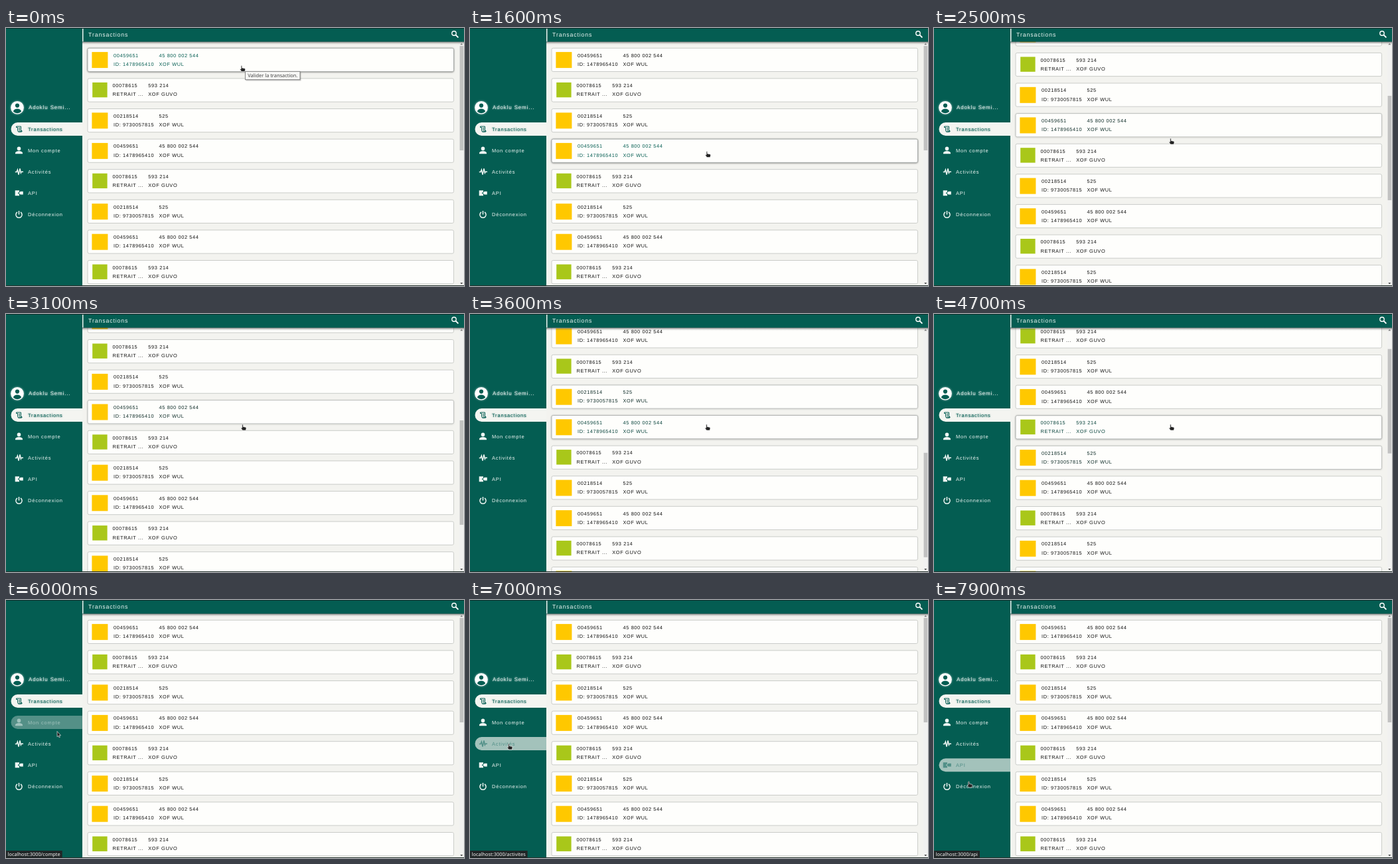
Animation, 690 px wide and 388 px high, one loop 8000 ms. Source, as an HTML page:

```html
<!DOCTYPE html>
<html lang="fr">
<head>
<meta charset="utf-8">
<title>Transactions</title>
<style>
  html, body { margin: 0; width: 100%; height: 100%; overflow: hidden; background: #f3f3ef; }
  svg { display: block; width: 100vw; height: 100vh; }
  text { font-family: "Liberation Sans", Arial, sans-serif; text-rendering: geometricPrecision; white-space: pre; }
  .cell { font-size: 7.4px; letter-spacing: .62px; }
  .nav { font-size: 7.5px; letter-spacing: .82px; }
  .user { font-size: 8px; letter-spacing: .85px; fill: #eef6f3; }
  .title { font-size: 8.8px; letter-spacing: .85px; fill: #eef6f3; }
  .system { font-family: "Noto Sans", "Open Sans", sans-serif; font-size: 7.4px; }
  .glow { filter: drop-shadow(0 0 1.5px #fff9); }
  .blur { filter: drop-shadow(.7px .8px .8px #045d5299); }
</style>
</head>
<body>
<svg viewBox="0 0 690 388" preserveAspectRatio="none">
  <defs>
    <linearGradient id="shade" x2="0" y2="1">
      <stop stop-color="#1d3a35" stop-opacity=".85"/>
      <stop offset=".4" stop-color="#444" stop-opacity=".35"/>
      <stop offset="1" stop-color="#888" stop-opacity="0"/>
    </linearGradient>
    <filter id="lift" x="-5%" y="-30%" width="110%" height="160%">
      <feDropShadow dx="0" dy=".5" stdDeviation="1.3" flood-color="#000" flood-opacity=".5"/>
    </filter>
  </defs>

  <rect width="690" height="388" fill="#f3f3ef"/>
  <g id="list"></g>

  <rect x="683" y="21" width="7" height="367" fill="#f1f1f0"/>
  <path d="M684.3 25.2l2-2.3 2 2.3z" fill="#777"/>
  <path d="M684.3 383l2 2.3 2-2.3z" fill="#444"/>
  <rect id="thumb" x="683.6" width="5.6" height="157" fill="#c1c1c1"/>

  <rect x="115" y="20" width="575" height="5" fill="url(#shade)"/>
  <rect x="115" width="575" height="20.5" fill="#045d52"/>
  <rect x="115" width="1.5" height="20.5" fill="#eef3f0"/>
  <text class="title" x="124" y="13.2">Transactions</text>
  <g fill="none" stroke="#fff">
    <circle cx="675" cy="8" r="3.2" stroke-width="1.4"/>
    <path d="M677.4 10.4l4 4" stroke-width="1.9"/>
  </g>

  <rect width="115" height="388" fill="#045d52"/>
  <g class="glow">
    <circle cx="17" cy="119.8" r="9.8" fill="#fff"/>
    <circle cx="17" cy="116.6" r="3.1" fill="#045d52"/>
    <path d="M10.8 125.6q1.4-4 6.2-4t6.2 4q-2.4 2.6-6.2 2.6t-6.2-2.6z" fill="#045d52"/>
    <text class="user" x="34" y="122.3">Adoklu Semi...</text>
  </g>
  <g id="nav"></g>

  <rect width="690" height="1" fill="#0b2e2a"/>
  <rect y="387" width="690" height="1" fill="#26332f"/>

  <g id="tooltip">
    <rect x="361.5" y="66.5" width="83" height="13" fill="#0003"/>
    <rect x="360.4" y="65.3" width="82.6" height="12.4" fill="#f7f7f5" stroke="#777" stroke-width=".9"/>
    <text class="system" x="364.3" y="74.2" fill="#444" font-weight="500">Valider la transaction.</text>
  </g>
  <g id="status">
    <rect y="377" height="11" fill="#202627"/>
    <text class="system" x="2.5" y="385.2" fill="#f2f2f2"></text>
  </g>

  <g id="cursor" stroke="#fff" stroke-width=".6" stroke-linejoin="round" fill="#222">
    <path id="hand" d="M-1.4 .6Q-.7-.5.2.6V3.5L4 4.2Q5.2 4.6 5 6L4.3 9H-.6L-3 5.8Q-2.8 4.6-1.4 5.4z"/>
    <path id="arrow" d="M0 0V8.2L1.9 6.6 3 9.3 4.4 8.7 3.3 6.1H5.6z"/>
  </g>
</svg>
<script>
const LOOP = 8000, STEP = 100;
const ROWS = 18, FIRST = 30.3, PITCH = 45.6, CARD_H = 35.2;
const BLACK = [18, 18, 18], GREEN = [4, 93, 82], WHITE = [238, 246, 243];

const $ = id => document.getElementById(id);
function add(parent, tag, attrs = {}, content = '') {
  const el = document.createElementNS('http://www.w3.org/2000/svg', tag);
  for (const key in attrs) el.setAttribute(key, attrs[key]);
  el.textContent = content;
  return parent.appendChild(el);
}
const mix = (a, b, k) => `rgb(${a.map((v, i) => Math.round(v + (b[i] - v) * k))})`;

// Linear interpolation through [time, ...values] stops.
function track(stops, t) {
  const next = stops.findIndex(s => s[0] >= t);
  if (next < 0) return stops.at(-1).slice(1);
  if (next === 0) return stops[0].slice(1);
  const a = stops[next - 1], b = stops[next], k = (t - a[0]) / (b[0] - a[0]);
  return a.slice(1).map((v, i) => v + (b[i + 1] - v) * k);
}

const SCROLL = [[1700, 0], [2500, 175.3], [3100, 311], [3500, 425], [3700, 425],
  [4100, 189.3], [4300, 120], [4400, 120], [5000, 0]];
const POINTER = [[0, 355.5, 56.5], [300, 357, 110], [800, 360, 238], [950, 360, 238], [1300, 357.5, 185.5],
  [1700, 357.5, 185.5], [2100, 357, 166], [5000, 357, 166], [5300, 310, 170], [5700, 110, 190],
  [6000, 77, 197.5], [6300, 70, 188], [6600, 62, 186], [6900, 60, 214], [7300, 56, 222],
  [7600, 54, 241], [7800, 53, 256], [7900, 53, 273]];
const scrollAt = t => track(SCROLL, t)[0];
const pointerAt = t => track(POINTER, t);

const KINDS = [
  { phone: '00459651', ref: 'ID: 1478965410', amount: '45 800 002 544', unit: 'XOF WUL',
    x: 162, x2: 230.5, logo: { x: 129.4, y: 5.8, width: 24, height: 24, fill: '#ffc800' } },
  { phone: '00078615', ref: 'RETRAIT ...', amount: '593 214', unit: 'XOF GUVO',
    x: 160.5, x2: 214.3, logo: { x: 130.2, y: 6, width: 22.4, height: 22.4, fill: '#a9c71a' } },
  { phone: '00218514', ref: 'ID: 9730057815', amount: '525', unit: 'XOF WUL',
    x: 162, x2: 230.5, logo: { x: 129.4, y: 5.8, width: 24, height: 24, fill: '#ffc800' } }
];
const cards = Array.from({ length: ROWS }, (_, i) => {
  const kind = KINDS[i % 3], top = FIRST + i * PITCH;
  const g = add($('list'), 'g', { transform: `translate(0 ${top})` });
  const box = { x: 123, width: 551.5, height: CARD_H, rx: 2.2, fill: '#fefefc', 'stroke-width': .9 };
  add(g, 'rect', { ...box, stroke: '#c6c8c5' });
  const lift = add(g, 'rect', { ...box, stroke: '#a4a8a5', filter: 'url(#lift)' });
  add(g, 'rect', kind.logo);
  const label = add(g, 'g', { class: 'cell' });
  add(label, 'text', { x: kind.x, y: 13.4 }, kind.phone);
  add(label, 'text', { x: kind.x, y: 26.6 }, kind.ref);
  add(label, 'text', { x: kind.x2, y: 13.4 }, kind.amount);
  add(label, 'text', { x: kind.x2, y: 26.6 }, kind.unit);
  return { top, lift, label };
});

// Icons are drawn around (19.5, 0); `line` icons are stroked.
const NAV = [
  { name: 'Transactions', y: 152, active: true, line: 1,
    icon: 'M16-4H22.5V4H18.5L17.5 2.5V-2.5H15.5V-4zM19-1.8H21.3M19 0H21.3M19 1.8H21.3M18.5 4H24V2.5H22.5' },
  { name: 'Mon compte', y: 184, path: 'compte',
    icon: 'M16.7-2.6a2.8 2.8 0 0 1 5.6 0a2.8 2.8 0 0 1-5.6 0zM14 5.2V3.6Q15 .9 19.5.9T25 3.6V5.2z' },
  { name: 'Activités', y: 216, path: 'activites', line: 1.5,
    icon: 'M13.8.6H16L17.4-3 19 4.6 21-4.6 22.4 2 23.3.2H26' },
  { name: 'API', y: 248.2, path: 'api',
    icon: 'M13.7-4H20V-2L17.8 0 20 2V4H13.7zM19.2 0L21.6-2.4H25.8V2.4H21.6z' },
  { name: 'Déconnexion', y: 280.5, line: 1.5,
    icon: 'M17-3.6A4.6 4.6 0 1 0 22-3.6M19.5-5.4V0' }
];
for (const item of NAV) {
  const g = add($('nav'), 'g', { transform: `translate(0 ${item.y})` });
  item.pill = add(g, 'path', { d: 'M115-10H17.5a10 10 0 0 0 0 20H115z', fill: '#f4f5f1' });
  item.mark = add(g, 'path', { d: item.icon, 'stroke-width': item.line || 0 });
  item.text = add(g, 'text', { class: item.active ? 'nav blur' : 'nav', x: 33, y: 2.6 }, item.name);
}

const overCard = (card, t) => {
  const [x, y] = pointerAt(t), dy = y + scrollAt(t) - card.top;
  return x > 123 && x < 674 && dy >= 0 && dy <= CARD_H;
};
const overNav = (item, t) => {
  const [x, y] = pointerAt(t);
  return !!item.path && x > 8 && x < 115 && Math.abs(y - item.y) <= 10;
};
// Hover fades in and out over three steps.
const recent = t => [0, 1, 2].map(n => Math.max(0, t - n * STEP));
const fade = (over, target, t) => recent(t).filter(s => over(target, s)).length / 3;

const statusBox = $('status').querySelector('rect'), statusText = $('status').querySelector('text');

function draw(t) {
  const scroll = scrollAt(t), [px, py] = pointerAt(t);
  $('list').setAttribute('transform', `translate(0 ${-scroll})`);
  $('thumb').setAttribute('y', 27 + scroll * .4277);

  for (const card of cards) {
    const k = fade(overCard, card, t);
    card.lift.setAttribute('opacity', k);
    card.label.setAttribute('fill', mix(BLACK, GREEN, k));
  }
  for (const item of NAV) {
    const k = item.active ? 1 : fade(overNav, item, t), color = mix(WHITE, GREEN, k);
    item.pill.setAttribute('opacity', k);
    item.text.setAttribute('fill', color);
    item.mark.setAttribute('fill', item.line ? 'none' : color);
    item.mark.setAttribute('stroke', item.line ? color : 'none');
  }

  const link = recent(t).map(s => NAV.find(item => overNav(item, s))).find(Boolean);
  $('status').style.display = link ? '' : 'none';
  if (link) {
    statusText.textContent = 'localhost:3000/' + link.path;
    statusBox.setAttribute('width', statusText.getComputedTextLength() + 5.5);
  }

  const pointing = t < 5300 || py > 270 || NAV.some(item => overNav(item, t)) || cards.some(c => overCard(c, t));
  $('hand').style.display = pointing ? '' : 'none';
  $('arrow').style.display = pointing ? 'none' : '';
  $('cursor').setAttribute('transform', `translate(${px} ${py})`);
  $('tooltip').style.display = t < 2 * STEP ? '' : 'none';
}

function frame(now) {
  draw(Math.floor(now % LOOP / STEP) * STEP);
  requestAnimationFrame(frame);
}
draw(0);
requestAnimationFrame(frame);
</script>
</body>
</html>
```
